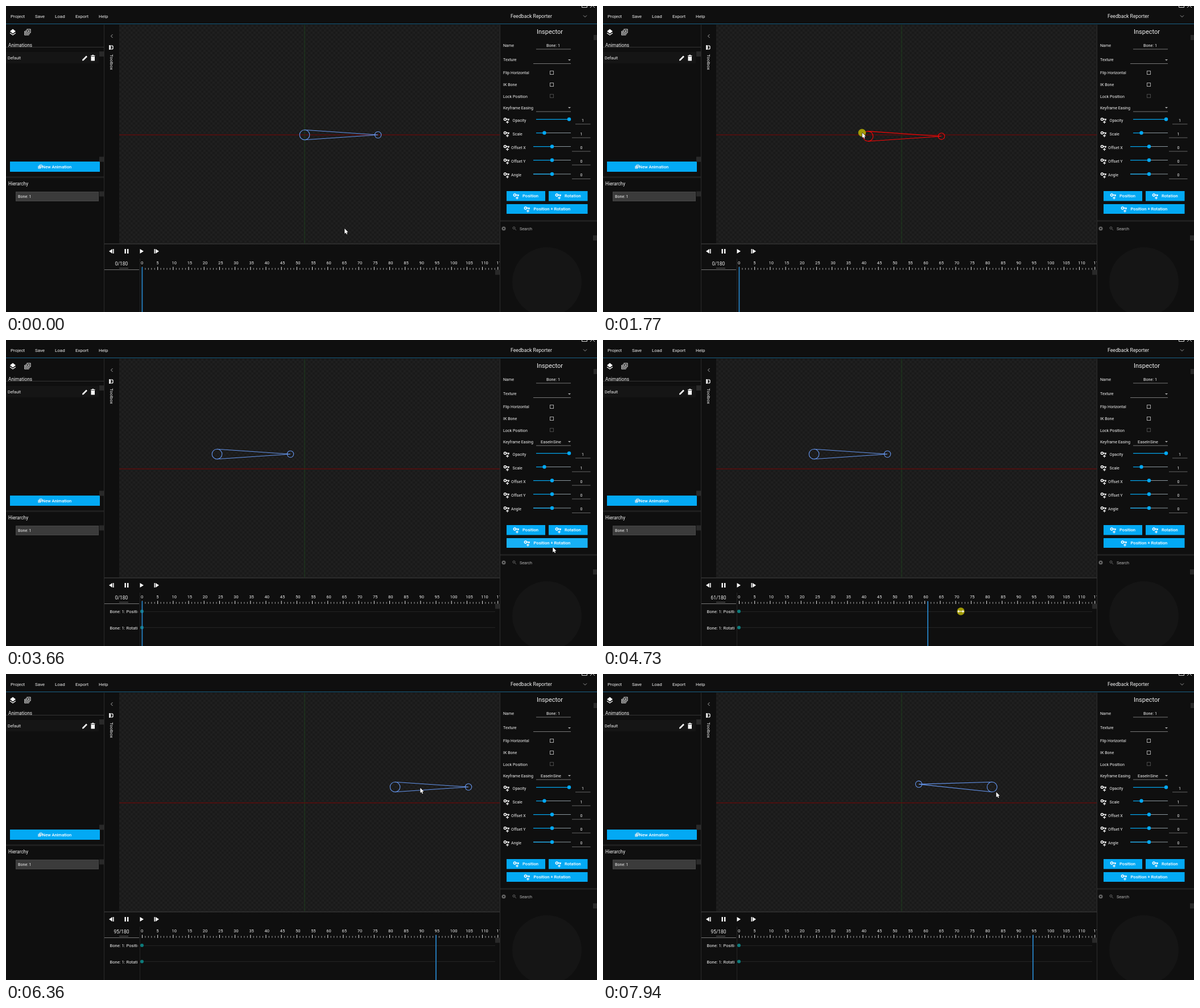
An HTML page with a canvas that plays this animation: 1039x539 px, repeating every 7990 ms.

```html
<!DOCTYPE html>
<html lang="en">
<head>
<meta charset="utf-8">
<title>Bone animation editor</title>
<style>
html, body { margin: 0; width: 100%; height: 100%; overflow: hidden; background: #0f0f0f; }
canvas { display: block; }
</style>
</head>
<body>
<canvas id="stage" width="1039" height="539"></canvas>
<script>
const W = 1039, H = 539, LOOP = 7990;
const ACCENT = '#03a9f4', BONE_LENGTH = 129, ZERO_X = 239.5, FRAME_W = 5.437;
const ctx = document.getElementById('stage').getContext('2d');
const backdrop = document.createElement('canvas');
backdrop.width = W;
backdrop.height = H;
let g = backdrop.getContext('2d');

// ---- drawing helpers ----
function rect(x, y, w, h, color) {
  g.fillStyle = color;
  g.fillRect(x, y, w, h);
}
function disc(x, y, r, color) {
  g.fillStyle = color;
  g.beginPath();
  g.arc(x, y, r, 0, Math.PI * 2);
  g.fill();
}
function ring(x, y, r, color, width = 1) {
  g.strokeStyle = color;
  g.lineWidth = width;
  g.beginPath();
  g.arc(x, y, r, 0, Math.PI * 2);
  g.stroke();
}
function trace(points, close) {
  g.beginPath();
  points.forEach(([x, y]) => g.lineTo(x, y));
  if (close) g.closePath();
}
function poly(points, color) {
  trace(points, true);
  g.fillStyle = color;
  g.fill();
}
function line(points, color, width = 1) {
  trace(points);
  g.strokeStyle = color;
  g.lineWidth = width;
  g.stroke();
}
function box(x, y, w, h, color) {
  g.strokeStyle = color;
  g.lineWidth = 1;
  g.strokeRect(x, y, w, h);
}
// y is the middle of the capital letters
function text(str, x, y, size, { color = '#f2f2f2', align = 'left', weight = 400 } = {}) {
  g.font = `${weight} ${size}px Roboto, sans-serif`;
  g.textAlign = align;
  g.fillStyle = color;
  g.fillText(str, x, y + size * 0.355);
}
function keyIcon(x, y) {
  ring(x - 2.6, y - 2, 2, '#fff', 1.5);
  line([[x - 0.5, y - 2], [x + 5, y - 2]], '#fff', 1.6);
  line([[x + 3.5, y - 2], [x + 3.5, y + 0.5]], '#fff', 1.4);
  line([[x - 1, y + 3], [x + 4, y + 3]], '#fff', 1.2);
  line([[x + 1.5, y + 0.5], [x + 1.5, y + 5.5]], '#fff', 1.2);
}
function button(x, y, w, h, label, labelX) {
  rect(x, y, w, h, ACCENT);
  text(label, labelX, y + h / 2, 7.6, { weight: 500, color: '#fff' });
}
function dropArrow(x, y) {
  poly([[x - 2.5, y - 1], [x + 2.5, y - 1], [x, y + 1.5]], '#aaa');
}
function copyIcon(x, y, s) {
  line([[x - s, y - s * 0.4], [x - s, y + s], [x + s * 0.5, y + s]], '#eee', 1.2);
  line([[x - s * 0.6, y - s * 0.7], [x - s * 0.6, y + s * 0.6], [x + s * 0.8, y + s * 0.6]], '#eee', 1);
  box(x - s * 0.2, y - s, s * 1.2, s * 1.2, '#eee');
  poly([[x + s * 0.2, y - s * 0.7], [x + s * 0.8, y - s * 0.4], [x + s * 0.2, y]], '#eee');
}

// ---- static interface ----
function drawTopBar() {
  [['Project', 8], ['Save', 51], ['Load', 86], ['Export', 122], ['Help', 163]]
    .forEach(([label, x]) => text(label, x, 18, 8));
  text('Feedback Reporter', 887, 18, 8.7);
  line([[1015, 16.5], [1018, 19.5], [1021, 16.5]], '#999');
  line([[1012.5, 0], [1012.5, 2.5], [1021.5, 2.5], [1021.5, 0]], '#ddd');
  line([[1027, 3], [1031, -1], [1035, 3]], '#ddd');
  rect(0, 31, W, 1, '#1a6388');
}

function drawLeftPanel() {
  poly([[12, 40.5], [17, 44.5], [12, 48.5], [7, 44.5]], '#fff');
  line([[7, 47.5], [12, 51], [17, 47.5]], '#fff', 1.3);
  copyIcon(38, 46, 5);
  text('Animations', 4, 69, 8.3);
  rect(0, 72, 172, 1, '#353535');
  rect(0, 81, 163, 20, '#151515');
  text('Default', 3, 91, 7.2);
  line([[135.5, 95], [142, 88.5]], '#fff', 2.6);
  poly([[134, 96.5], [134.5, 93.5], [137, 96]], '#fff');
  rect(149.5, 89, 6.5, 7.5, '#fff');
  rect(149, 87, 7.5, 1.2, '#fff');
  rect(151.3, 86, 3, 1, '#fff');
  button(7, 274, 158, 18, 'New Animation', 63.5);
  copyIcon(60, 283, 3);
  rect(0, 300, 172, 3, '#1f1f1f');
  text('Hierarchy', 4, 313, 8.3);
  rect(17, 327, 146, 17, '#3b3b3b');
  box(17.5, 327.5, 145, 16, '#464646');
  text('Bone: 1', 21, 335.5, 7.1);
}

function drawViewport() {
  line([[187.5, 50], [184.5, 53], [187.5, 56]], '#aaa');
  rect(181, 69, 3.5, 8, '#ddd');
  line([[185.5, 69.5], [188, 71], [188, 75], [185.5, 76.5]], '#ddd', 1.5);
  g.save();
  g.translate(186, 85);
  g.rotate(Math.PI / 2);
  text('Toolbox', 0, 0, 7.8);
  g.restore();
  rect(199, 33, 669, 385, '#1a1a1a');
  g.fillStyle = '#1f1f1f';
  for (let y = 33, row = 0; y < 418; y += 4, row++)
    for (let x = 199 + row % 2 * 4; x < 868; x += 8)
      g.fillRect(x, y, Math.min(4, 868 - x), Math.min(4, 418 - y));
  rect(524.5, 33, 1, 385, '#1c411c');
  rect(199, 226.5, 669, 1, '#7d0505');
  rect(172, 33, 1, 506, '#2b2b2b');
  rect(173, 418, 695, 2, '#2b2b2b');
}

function drawTimeline() {
  rect(173, 420, 695, 119, '#0f0f0f');
  poly([[187, 428], [187, 436], [181, 432]], '#fff');
  rect(188, 428, 1.6, 8, '#fff');
  rect(208.5, 428, 2.4, 8, '#fff');
  rect(213, 428, 2.4, 8, '#fff');
  poly([[235.5, 428], [242, 432], [235.5, 436]], '#fff');
  rect(260.5, 428, 1.6, 8, '#fff');
  poly([[263, 428], [269, 432], [263, 436]], '#fff');
  rect(173, 464, 61, 1, '#777');
  rect(199, 461.5, 16, 0.8, '#777');
  rect(235, 445, 1, 94, '#242424');
  g.save();
  g.beginPath();
  g.rect(236, 440, 632, 40);
  g.clip();
  for (let i = 0; i <= 115; i++) {
    const x = ZERO_X + i * FRAME_W, major = i % 5 === 0;
    rect(x - 0.5, major ? 459.5 : 461.5, 1, major ? 5.5 : 3, major ? '#eee' : '#aaa');
    if (major) text(String(i), x - 2.4, 452.5, 7.5);
  }
  g.restore();
}

function drawSlider(label, y, from, knob, value, valueX) {
  keyIcon(880, y + 0.5);
  text(label, label === 'Opacity' || label === 'Scale' ? 890.5 : 888, y, 7.1);
  rect(from, y - 2, 993 - from, 1, '#8a979e');
  rect(from, y - 2, knob - from, 1.2, ACCENT);
  disc(knob, y - 1.5, 3.2, ACCENT);
  text(value, valueX, y, 7.1, { align: 'center' });
  const left = label === 'Opacity' ? 1001 : 995;
  rect(left, y + 6.5, 1027.5 - left, 1, '#666');
}

function drawInspector() {
  rect(868, 33, 1, 506, '#2e2e2e');
  text('Inspector', 956, 45, 11, { align: 'center' });
  [['Name', 69.5], ['Texture', 94.5], ['Flip Horizontal', 117.5], ['IK Bone', 138.5],
    ['Lock Position', 159], ['Keyframe Easing', 179]]
    .forEach(([label, y]) => text(label, 874, y, 7.1));
  text('Bone: 1', 962, 69, 7.2, { align: 'center' });
  rect(932, 75.5, 61, 1, '#777');
  rect(927, 101, 66, 1, '#777');
  rect(932, 185.5, 61, 1, '#777');
  dropArrow(990.5, 95);
  dropArrow(990.5, 179);
  [[118, '#aaa'], [138.5, '#aaa'], [159, '#484848']]
    .forEach(([y, color]) => box(956.5, Math.round(y) - 3.5, 6, 6, color));
  drawSlider('Opacity', 201, 932, 990, '1', 1014);
  drawSlider('Scale', 225, 932, 946.5, '1', 1011.5);
  drawSlider('Offset X', 249, 927, 960, '0', 1011.5);
  drawSlider('Offset Y', 273, 927, 960, '0', 1011.5);
  drawSlider('Angle', 297.5, 927, 960, '0', 1011.5);
  button(880, 326, 68, 17.5, 'Position', 908);
  button(954, 326, 68.5, 17.5, 'Rotation', 982);
  button(880, 349, 142.5, 17, 'Position + Rotation', 927.5);
  keyIcon(897, 335);
  keyIcon(971, 335);
  keyIcon(916, 358);
  rect(869, 377, 170, 3, '#1f1f1f');
  disc(875, 392, 3.5, '#666');
  line([[873.8, 390.8], [876.2, 393.2]], '#111');
  line([[876.2, 390.8], [873.8, 393.2]], '#111');
  ring(893, 391, 2, '#666');
  line([[894.5, 392.5], [897, 395]], '#666');
  text('Search', 903, 392, 7.2, { color: '#b5b5b5' });
  disc(951, 486, 61, '#151515');
}

function drawBackdrop() {
  rect(0, 0, W, H, '#0f0f0f');
  drawTopBar();
  drawLeftPanel();
  drawViewport();
  drawTimeline();
  drawInspector();
  [[164, 80], [164, 265.5], [164, 326.5], [1033, 51], [1032, 404], [860, 464.5]]
    .forEach(([x, y]) => rect(x, y, 8, 9, '#292929'));
}

// ---- motion ----
// time, x, y of the pointer
const POINTER = [
  [120, 595, 392], [700, 508, 212], [890, 523, 224], [1080, 522, 232], [1170, 510, 242],
  [1230, 493, 240], [1400, 485, 237], [1720, 463, 226], [2150, 369, 198], [2260, 369, 198],
  [2400, 526, 220], [2540, 941, 306], [2700, 955, 360], [3370, 961, 365], [4380, 961, 365],
  [4570, 240, 478], [4610, 240, 478], [4700, 571, 478], [4730, 629, 478], [4900, 735, 479],
  [5100, 756, 480], [5200, 756, 480], [5580, 379, 202], [5760, 379, 202], [6180, 692, 200],
  [6280, 692, 200], [6500, 812, 202], [6790, 812, 202], [6870, 794, 255], [6940, 735, 305],
  [7020, 640, 282], [7090, 540, 232], [7130, 473, 215], [7330, 447, 190], [7470, 447, 190],
  [7610, 776, 237], [7790, 776, 237], [7940, 691, 208]
];
const PRESSES = [[940, 2220], [3050, 3450], [4600, 5190], [5720, 6230], [6790, 7450]];
const RED_SPANS = [[940, 2240], [5810, 6250]];
const KEYED_AT = 3200;

const clamp = (v, lo, hi) => Math.min(hi, Math.max(lo, v));
const within = (spans, t) => spans.some(([from, to]) => t >= from && t < to);

// Monotone cubic interpolation: smooth, without overshoot
function slope(keys, i, axis) {
  if (i === 0 || i === keys.length - 1) return 0;
  const rate = k => (keys[k + 1][axis] - keys[k][axis]) / (keys[k + 1][0] - keys[k][0]);
  const a = rate(i - 1), b = rate(i);
  return a * b <= 0 ? 0 : 2 * a * b / (a + b);
}
function pointerAt(t) {
  const last = POINTER.length - 1;
  t = clamp(t, POINTER[0][0], POINTER[last][0]);
  let i = 0;
  while (i < last - 1 && t >= POINTER[i + 1][0]) i++;
  const a = POINTER[i], b = POINTER[i + 1], span = b[0] - a[0], u = (t - a[0]) / span;
  return [1, 2].map(axis => {
    const m = slope(POINTER, i, axis) * span, n = slope(POINTER, i + 1, axis) * span;
    const d = b[axis] - a[axis];
    return a[axis] + u * (m + u * (3 * d - 2 * m - n + u * (m + n - 2 * d)));
  });
}

// The bone trails the pointer slightly while dragged
function boneAt(t) {
  const first = t < 5720;
  const [px, py] = pointerAt(first ? clamp(t - 60, 890, 2200) : clamp(t - 60, 5720, 6220));
  const x = px + (first ? 2 : -8), y = py + (first ? 3 : -1);
  if (t < 6790) return { x, y, angle: 0 };
  const [cx, cy] = pointerAt(clamp(t - 40, 6790, 7400));
  return { x, y, angle: Math.atan2(cy - y, cx - x) };
}

function drawBone(t) {
  const { x, y, angle } = boneAt(t);
  const color = within(RED_SPANS, t) ? '#ff0505' : '#6495ed';
  g.save();
  g.translate(x, y);
  g.rotate(angle);
  ring(0, 0, 8.8, color, 1.1);
  ring(BONE_LENGTH, 0, 5.7, color, 1.1);
  line([[0, -8.8], [BONE_LENGTH, 0], [0, 8.8]], color, 1.1);
  g.restore();
}

function drawTracks(t) {
  const frame = t < 4610 ? 0
    : clamp(Math.round((pointerAt(Math.min(t - 30, 5170))[0] - ZERO_X) / FRAME_W), 0, 95);
  text(`${frame}/180`, 203, 454.5, 8.4, { align: 'center' });
  if (t >= KEYED_AT) {
    text('EaseInSine', 958, 179, 7.3, { align: 'center' });
    ['Position', 'Rotation'].forEach((name, i) => {
      const y = 478 + i * 28.5;
      g.save();
      g.beginPath();
      g.rect(173, y - 8, 58.5, 16);
      g.clip();
      text(`Bone: 1: ${name}`, 182.5, y + 0.5, 7.6);
      g.restore();
      rect(236, Math.floor(y), 624, 1, '#242424');
      disc(239, y, 3, '#0d7b7b');
    });
  }
  rect(ZERO_X + frame * FRAME_W - 1, 460, 1.8, 79, '#2782c4');
}

function drawPointer(t) {
  const [x, y] = pointerAt(t);
  if (within(PRESSES, t)) disc(x, y, 6.7, 'rgba(176,168,4,0.9)');
  g.save();
  g.translate(x, y);
  if (t >= 4580 && t < 5200) {
    line([[-4, 0], [4, 0]], '#fff', 1.2);
    [-1, 1].forEach(s => poly([[s * 6, 0], [s * 3, -2.5], [s * 3, 2.5]], '#fff'));
  } else {
    const arrow = [[0.3, 0], [0.3, 9], [2.3, 7.2], [3.8, 10.3], [5.2, 9.6], [3.8, 6.7], [6.5, 6.5]];
    trace(arrow, true);
    g.strokeStyle = '#000';
    g.lineWidth = 1;
    g.stroke();
    poly(arrow, '#fff');
  }
  g.restore();
}

function draw(t) {
  g.drawImage(backdrop, 0, 0);
  drawTracks(t);
  if (t >= 3420 && t < 4130)
    rect(880, 349, 142.5, 17, `rgba(255,255,255,${0.12 * (4130 - t) / 710})`);
  drawBone(t);
  drawPointer(t);
}

drawBackdrop();
g = ctx;
let start;
function tick(now) {
  start ??= now;
  draw((now - start) % LOOP);
  requestAnimationFrame(tick);
}
draw(0);
requestAnimationFrame(tick);
</script>
</body>
</html>
```
